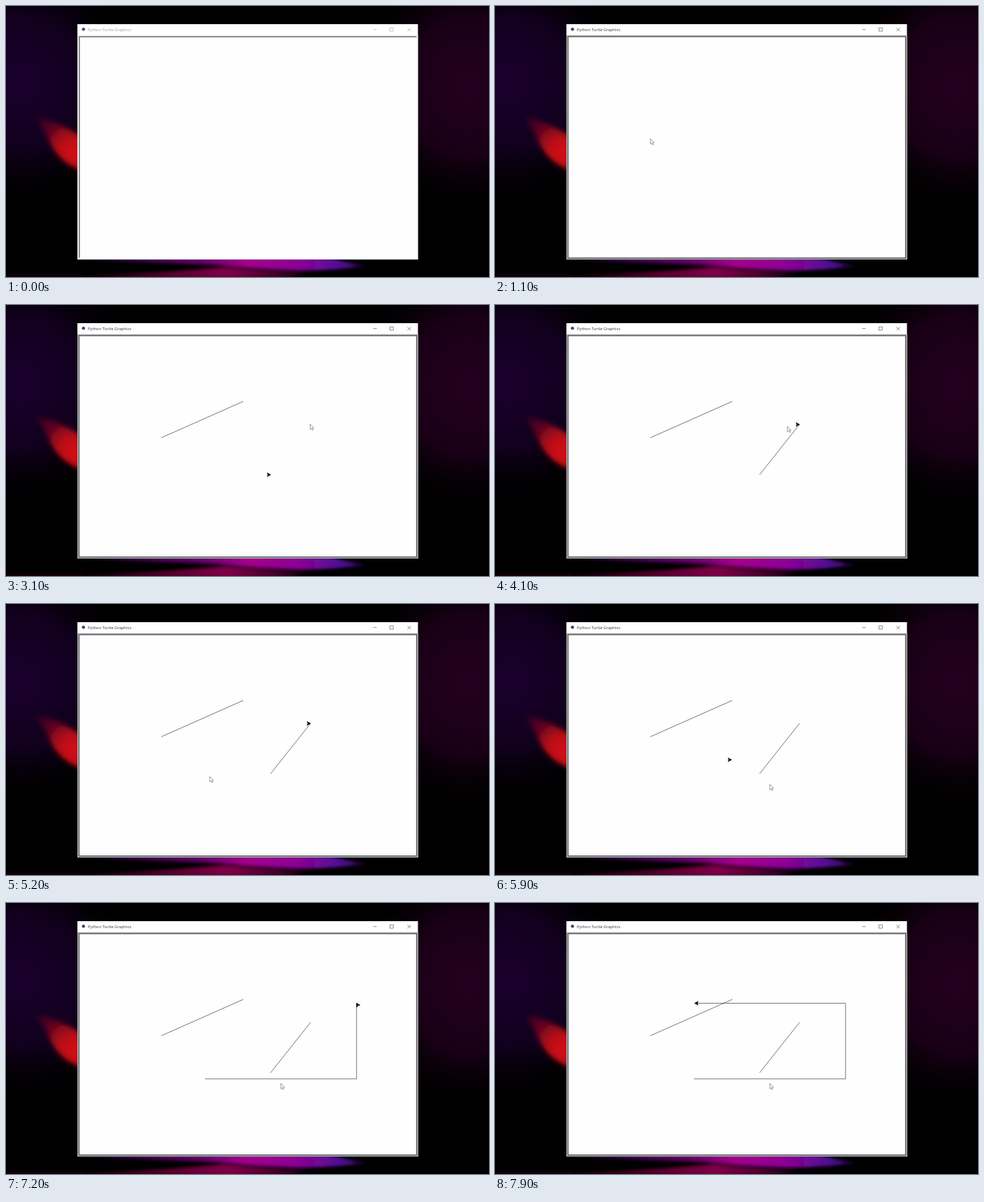
An HTML page for the animation above (8000 ms loop, 690 by 388 pixels).

```html
<!DOCTYPE html>
<html lang="en">
<head>
<meta charset="utf-8">
<title>Turtle drawing</title>
<style>
  html, body { margin: 0; width: 100%; height: 100%; overflow: hidden; background: #000; }
  svg { display: block; width: 690px; height: 388px; }
  .title { font: 5.85px "Open Sans", "Noto Sans", sans-serif; }
</style>
</head>
<body>
<svg viewBox="0 0 690 388">
  <defs>
    <radialGradient id="violet"><stop stop-color="#1b002e"/><stop offset=".55" stop-color="#11001d"/><stop offset="1" stop-color="#000" stop-opacity="0"/></radialGradient>
    <radialGradient id="plum"><stop stop-color="#24001f"/><stop offset=".55" stop-color="#190016"/><stop offset="1" stop-color="#000" stop-opacity="0"/></radialGradient>
    <radialGradient id="feather" gradientUnits="userSpaceOnUse" cx="98" cy="211" r="78">
      <stop stop-color="#d40814"/><stop offset=".3" stop-color="#b80818"/><stop offset=".6" stop-color="#600620"/>
      <stop offset="1" stop-color="#1c0020"/>
    </radialGradient>
    <linearGradient id="glow" gradientUnits="userSpaceOnUse" x1="90" y1="0" x2="530" y2="0">
      <stop stop-color="#0c0012"/><stop offset=".2" stop-color="#38064a"/><stop offset=".42" stop-color="#600664"/>
      <stop offset=".58" stop-color="#a4008c"/><stop offset=".74" stop-color="#8c0494"/><stop offset=".88" stop-color="#500a94"/>
      <stop offset="1" stop-color="#10001c"/>
    </linearGradient>
    <linearGradient id="ember" gradientUnits="userSpaceOnUse" x1="90" y1="0" x2="440" y2="0">
      <stop stop-color="#14000c"/><stop offset=".35" stop-color="#4c0026"/><stop offset=".65" stop-color="#800048"/>
      <stop offset="1" stop-color="#180010"/>
    </linearGradient>
    <filter id="soft" x="-20%" y="-50%" width="140%" height="200%"><feGaussianBlur stdDeviation="2"/></filter>
    <filter id="softer" x="-30%" y="-30%" width="160%" height="160%"><feGaussianBlur stdDeviation="3.6"/></filter>
  </defs>

  <rect width="690" height="388"/>
  <ellipse cx="20" cy="110" rx="170" ry="175" fill="url(#violet)"/>
  <ellipse cx="660" cy="115" rx="160" ry="180" fill="url(#plum)"/>
  <path d="M40 158C62 163 84 170 112 190V236C86 230 70 212 62 194Q54 174 40 158Z" fill="url(#feather)" filter="url(#softer)"/>
  <g filter="url(#soft)">
    <path d="M90 360H460Q490 368 515 372Q480 378 420 379Q350 376 300 371Q190 367 90 362Z" fill="url(#glow)"/>
    <path d="M90 388Q220 382 310 374Q370 378 430 384L400 390H90Z" fill="url(#ember)"/>
    <path d="M0 384H110V390H0Z" fill="#16000e"/>
  </g>

  <rect x="102" y="26" width="486.5" height="337" fill="#fff"/>
  <rect x="102" y="42" width="486.5" height="321" fill="#efeff0"/>
  <rect x="104" y="43" width="483" height="318" fill="#fefefe"/>
  <path id="bevel" d="M104.8 360.5V44H586.5" fill="none" stroke="#68666e" stroke-width="1.4"/>
  <g id="ring" fill="none">
    <rect x="102.5" y="42.5" width="485.5" height="320" stroke="#b4b4b6"/>
    <rect x="104.2" y="43.7" width="482.6" height="317.2" stroke="#6c6c70" stroke-width="1.9"/>
  </g>
  <circle cx="110.7" cy="33.2" r="2.3" fill="#44446c"/>
  <text id="title" class="title" x="117" y="36">Python Turtle Graphics</text>
  <path id="controls" d="M524.5 33.7H529.7M548.5 31.3H553.3V36.1H548.5ZM573.5 31.3L578.5 36.3M578.5 31.3L573.5 36.3" fill="none" stroke-width=".55"/>

  <path id="ink" fill="none" stroke="#14141c" stroke-width=".58"/>
  <path id="turtle" d="M.2 0L-5 2.8L-3.9 0L-5 -2.8Z" stroke="#000" stroke-width=".5"/>
  <path id="pointer" d="M0 0V7.7L1.7 6.2L2.9 8.8L4.1 8.3L3 5.7H5.2Z" fill="#fff" stroke="#505050" stroke-width=".55"/>
</svg>
<script>
const LOOP = 8000, STEP = 100;
const FOCUS_TIME = 400;
const SPEED = 0.38;       // turtle pixels per ms
const TURN_TIME = 209;    // one quarter turn
const el = id => document.getElementById(id);
const mix = (a, b, p) => a + (b - a) * p;

// Each job starts at a time and runs its steps one after another.
const jobs = [
  { at: 1410, steps: [{ to: [222, 190] }, { to: [339, 138], pen: true }] },
  { at: 2805, steps: [{ to: [378, 243] }, { to: [435, 171], pen: true }] },
  { at: 5610, steps: [
    { to: [284.3, 251.8] }, { to: [500.8, 251.8], pen: true }, { turn: -90 },
    { to: [500.8, 143.5], pen: true }, { turn: -90 }, { to: [284.3, 143.5], pen: true }
  ] }
];

// Pointer stops: time, x, y
const stops = [
  [500, 214, 216], [1000, 222, 190], [1200, 222, 190], [1400, 338, 138], [2100, 338, 138],
  [2200, 355, 170], [2500, 378, 243], [2600, 378, 243], [2800, 434.5, 170.5], [3600, 434.5, 170.5],
  [4300, 411, 175], [4400, 411, 175], [4500, 410, 175], [4700, 410, 175],
  [5200, 291.2, 247], [5300, 284, 251], [5400, 284, 251], [5700, 392.7, 258.3]
];

function schedule() {
  const moves = [];
  let pos = [344.5, 202], angle = 0;
  for (const job of jobs) {
    let start = job.at;
    for (const { to = pos, turn = 0, pen = false } of job.steps) {
      const length = Math.hypot(to[0] - pos[0], to[1] - pos[1]);
      const time = turn ? TURN_TIME : length / SPEED;
      moves.push({ start, time, from: pos, to, angle, turn, pen });
      start += time;
      pos = to;
      angle += turn;
    }
  }
  return moves;
}
const moves = schedule();

function drawTurtle(t) {
  let ink = "", pose = null;
  for (const m of moves) {
    if (t < m.start) break;
    const p = Math.min(1, (t - m.start) / m.time);
    const x = mix(m.from[0], m.to[0], p), y = mix(m.from[1], m.to[1], p);
    if (m.pen) ink += `M${m.from}L${x} ${y}`;
    pose = `translate(${x} ${y}) rotate(${m.angle + m.turn * p})`;
  }
  el("ink").setAttribute("d", ink);
  el("turtle").style.display = pose ? "" : "none";
  if (pose) el("turtle").setAttribute("transform", pose);
}

function drawPointer(t) {
  const shown = t >= stops[0][0];
  el("pointer").style.display = shown ? "" : "none";
  if (!shown) return;
  const next = stops.findIndex(s => s[0] > t);
  const b = next < 0 ? stops[stops.length - 1] : stops[next];
  const a = next < 0 ? b : stops[next - 1];
  const p = a === b ? 1 : (t - a[0]) / (b[0] - a[0]);
  el("pointer").setAttribute("transform", `translate(${mix(a[1], b[1], p)} ${mix(a[2], b[2], p)})`);
}

function drawWindow(t) {
  const focused = t >= FOCUS_TIME;
  el("ring").style.display = focused ? "" : "none";
  el("bevel").style.display = focused ? "none" : "";
  el("title").setAttribute("fill", focused ? "#333" : "#999");
  el("controls").setAttribute("stroke", focused ? "#333" : "#999");
}

function render(now) {
  const t = Math.floor((now % LOOP) / STEP) * STEP;
  drawWindow(t);
  drawTurtle(t);
  drawPointer(t);
}

let origin = null;
function frame(now) {
  origin ??= now;
  render(now - origin);
  requestAnimationFrame(frame);
}
render(0);
requestAnimationFrame(frame);
</script>
</body>
</html>
```
